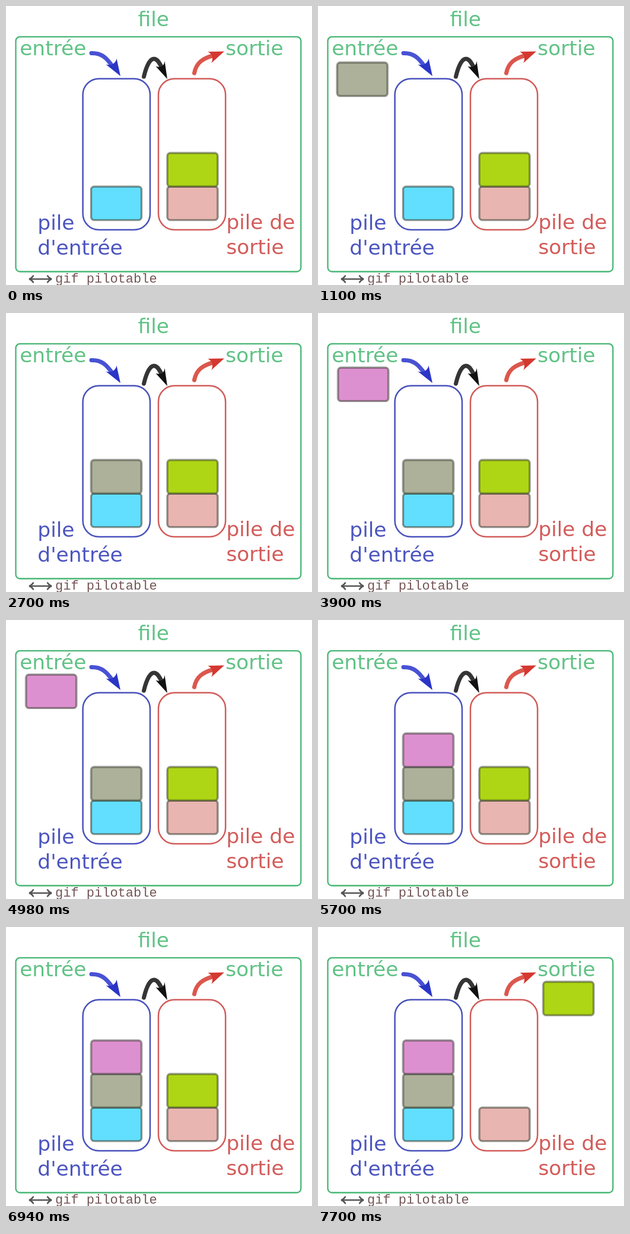
An HTML page that plays this animation: 516 px wide and 470 px high, repeating every 8 s.

```html
<!DOCTYPE html>
<html lang="fr">
<head>
<meta charset="utf-8">
<title>File à deux piles</title>
<style>
  html, body { margin: 0; width: 100%; height: 100%; overflow: hidden; background: #fff; }
  svg { display: block; width: 516px; height: 470px; }
  text { font: 34.4px "DejaVu Sans", sans-serif; }
  .note { font: 22px "Liberation Mono", monospace; fill: #745555; }
  .line { fill: none; stroke-width: 2.5; }
  .shaft { fill: none; stroke-width: 7; stroke-linecap: round; }

  .block {
    width: 85px; height: 56.4px; rx: 5px;
    stroke: #2d3327; stroke-opacity: .5; stroke-width: 3.4;
  }
  .move { animation: 8s step-end infinite; }
  .grey { animation-name: grey; }
  .pink { animation-name: pink; }
  .green { animation-name: green; }

  /* waiting at the entrance, then pushed */
  @keyframes grey {
    0% { visibility: hidden; transform: translate(32.2px, 95.2px); }
    13.75% { visibility: visible; transform: translate(32.2px, 95.2px); }
    33.75%, 100% { visibility: visible; transform: translate(143.5px, 247.6px); }
  }
  @keyframes pink {
    0% { visibility: hidden; transform: translate(33.7px, 92px); }
    48.75% { visibility: visible; transform: translate(33.7px, 92px); }
    71.25%, 100% { visibility: visible; transform: translate(143.5px, 191.1px); }
  }
  /* popped at the exit */
  @keyframes green {
    0% { transform: translate(272px, 247.6px); }
    96.25%, 100% { transform: translate(379.8px, 92.3px); }
  }
</style>
</head>
<body>
<svg viewBox="0 0 516 470">
  <rect class="line" x="16.5" y="51.8" width="480.8" height="395.7" rx="7" stroke="#47b674" style="stroke-width:2.3"/>
  <rect class="line" x="129.6" y="122.4" width="113.4" height="254.6" rx="27" stroke="#4952bd"/>
  <rect class="line" x="257" y="122.4" width="113.2" height="254.6" rx="27" stroke="#d25c5a"/>

  <g fill="#60c285">
    <text x="222.5" y="34">file</text>
    <text x="23.2" y="83">entrée</text>
    <text x="370.3" y="83">sortie</text>
  </g>
  <g fill="#4c55bf">
    <text x="53.3" y="377">pile</text>
    <text x="53.3" y="419">d'entrée</text>
  </g>
  <g fill="#d25c5a">
    <text x="371.4" y="376">pile de</text>
    <text x="371.4" y="418">sortie</text>
  </g>

  <path class="shaft" stroke="#4852d4" d="M144 79.5C162 79 170 88 180 102"/>
  <path fill="#2b35c6" d="M193 118L168.500 98.500Q176 100 180 98Q185 95 186.500 88.500Z"/>
  <path class="shaft" stroke="#353535" d="M232.500 119C237 100 243 89 249.500 89C255 89 259 96 264 106"/>
  <path fill="#111" d="M272 123L252.500 101.500Q259 103.500 263 101.500Q267 99 267.500 92.500Z"/>
  <path class="shaft" stroke="#dc574d" d="M317.500 113C321 95 332 88 351 83"/>
  <path fill="#d43830" d="M368 76.500L346.500 96Q349 89 347.500 85Q346 80 340.500 77Z"/>

  <g fill="none" stroke="#555" stroke-width="2.4" stroke-linecap="round">
    <path d="M40 460H76M46 454.500Q43 459 39 460Q43 461 46 465.500M70 454.500Q73 459 77 460Q73 461 70 465.500"/>
  </g>
  <text class="note" x="83" y="465.500">gif pilotable</text>

  <rect class="block" x="143.500" y="304.200" fill="#62dffe"/>
  <rect class="block" x="272" y="304.200" fill="#e8b5b0"/>
  <rect class="block move grey" fill="#adb19a"/>
  <rect class="block move pink" fill="#dd90cf"/>
  <rect class="block move green" fill="#afd614"/>
</svg>
</body>
</html>
```
